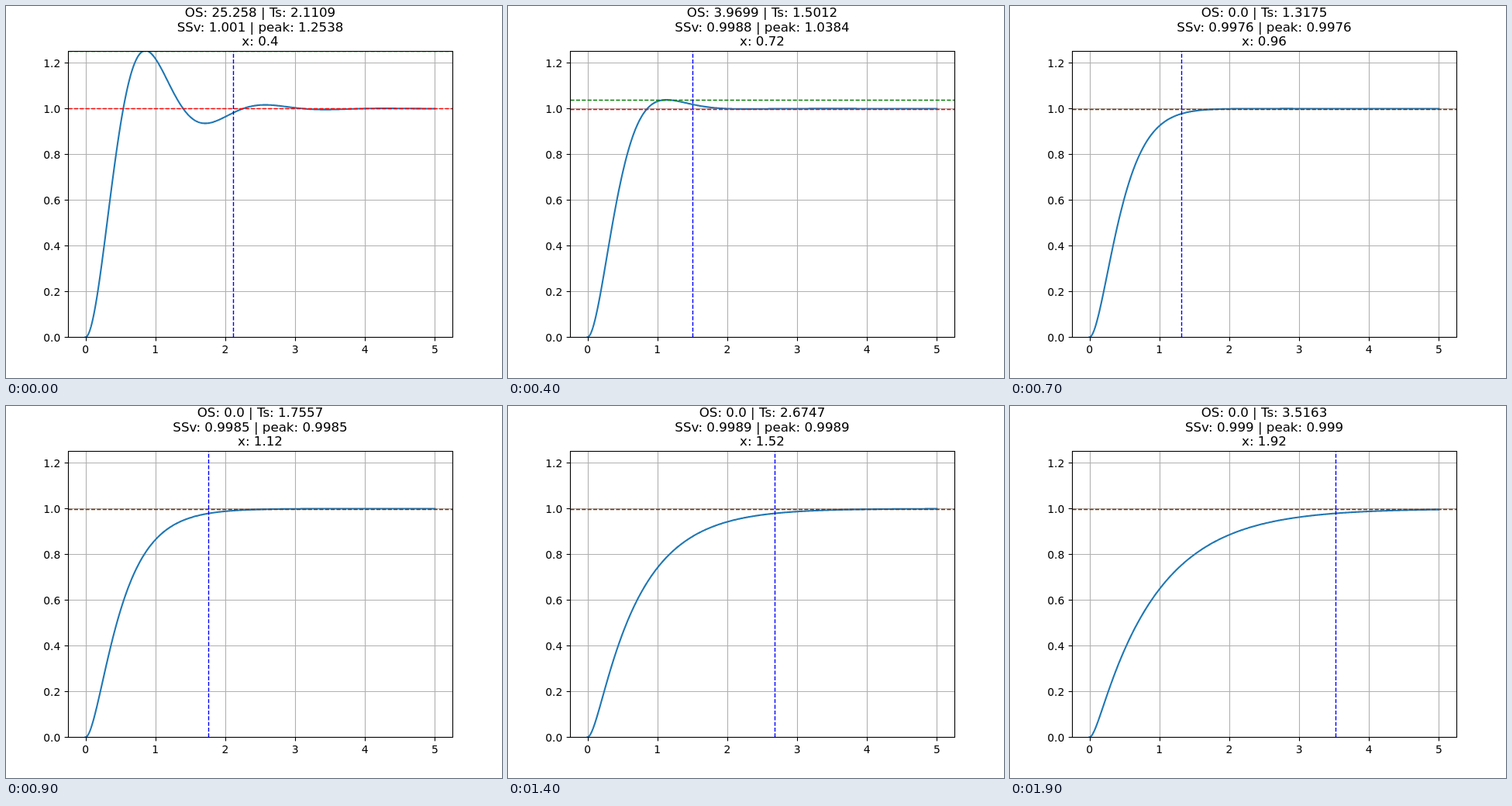
Animation of 640 by 480 pixels, one loop 2000 ms. Source, as an HTML page with a canvas:

```html
<!DOCTYPE html>
<html lang="en">
<head>
<meta charset="utf-8">
<title>Second-order step response</title>
<style>
  html, body { margin: 0; width: 100%; height: 100%; overflow: hidden; background: #fff; }
  canvas { display: block; }
</style>
</head>
<body>
<canvas id="stage" width="640" height="480"></canvas>
<script>
const ctx = document.getElementById("stage").getContext("2d");
const POINT = 100 / 72;               // pixels per typographic point
const BOX = { left: 80, right: 576, top: 57.6, bottom: 427.2 };
const NATURAL_FREQ = 4;
const STEPS = 20, STEP_MS = 100;
const Y_MAX = 1 + Math.exp(-Math.PI * 0.4 / Math.sqrt(1 - 0.4 ** 2));

const toX = t => BOX.left + (t + 0.25) * (BOX.right - BOX.left) / 5.5;
const toY = v => BOX.bottom - v * (BOX.bottom - BOX.top) / Y_MAX;
const snap = p => Math.round(p) + 0.5;

// Unit step response for damping ratio z.
function response(z, t) {
  const decay = z * NATURAL_FREQ;
  const root = NATURAL_FREQ * Math.sqrt(Math.abs(1 - z * z));
  if (z < 1) {
    return 1 - Math.exp(-decay * t) * (Math.cos(root * t) + decay / root * Math.sin(root * t));
  }
  const slow = decay - root, fast = decay + root;
  return 1 - (fast * Math.exp(-slow * t) - slow * Math.exp(-fast * t)) / (fast - slow);
}

// Measured over seven time constants, sampled at 1000 points.
function stepInfo(z) {
  const rate = NATURAL_FREQ * (z < 1 ? z : z - Math.sqrt(z * z - 1));
  const dt = 7 / rate / 999;
  const samples = Array.from({ length: 1000 }, (_, i) => response(z, i * dt));
  const final = samples[999];
  const peak = Math.max(...samples);
  let i = 999;
  while (i > 0 && Math.abs(samples[i] - final) < 0.02 * final) i--;
  return { final, peak, overshoot: 100 * (peak - final) / final, settling: (i + 1) * dt };
}

function format(value) {
  const rounded = +value.toFixed(4);
  return Number.isInteger(rounded) ? rounded.toFixed(1) : String(rounded);
}

function line(x1, y1, x2, y2, color, points, dash = []) {
  ctx.strokeStyle = color;
  ctx.lineWidth = points * POINT;
  ctx.setLineDash(dash.map(d => d * points * POINT));
  ctx.beginPath();
  ctx.moveTo(x1, y1);
  ctx.lineTo(x2, y2);
  ctx.stroke();
  ctx.setLineDash([]);
}

function text(str, x, y, points, align) {
  ctx.font = `${points * POINT}px "DejaVu Sans", sans-serif`;
  ctx.textAlign = align;
  ctx.fillStyle = "#000";
  ctx.fillText(str, x, y);
}

const left = snap(BOX.left), right = snap(BOX.right);
const top_ = snap(BOX.top), bottom = snap(BOX.bottom);
const DASH = [3.7, 1.6];
const horizontal = (v, color, width, dash) => line(left, snap(toY(v)), right, snap(toY(v)), color, width, dash);
const vertical = (t, color, width, dash) => line(snap(toX(t)), bottom, snap(toX(t)), top_, color, width, dash);

function drawAxes() {
  const tick = 3.5 * POINT;
  for (let t = 0; t <= 5; t++) {
    const x = snap(toX(t));
    vertical(t, "#b0b0b0", 0.8);
    line(x, bottom, x, bottom + tick, "#000", 0.8);
    text(String(t), toX(t), 448, 10, "center");
  }
  for (let i = 0; i <= 6; i++) {
    const v = i / 5, y = snap(toY(v));
    horizontal(v, "#b0b0b0", 0.8);
    line(left - tick, y, left, y, "#000", 0.8);
    text(v.toFixed(1), BOX.left - 2 * tick, Math.round(toY(v) + 5.3), 10, "right");
  }
}

function drawCurve(z) {
  ctx.strokeStyle = "#1f77b4";
  ctx.lineWidth = 1.5 * POINT;
  ctx.lineJoin = "round";
  ctx.lineCap = "square";
  ctx.beginPath();
  for (let i = 0; i <= 500; i++) ctx.lineTo(toX(i / 100), toY(response(z, i / 100)));
  ctx.stroke();
  ctx.lineCap = "butt";
}

function draw(step) {
  const z = +(0.4 + 0.08 * step).toFixed(2);
  const info = stepInfo(z);
  const overlapping = info.peak - info.final < 1e-4;

  ctx.fillStyle = "#fff";
  ctx.fillRect(0, 0, 640, 480);
  drawAxes();

  ctx.save();
  ctx.beginPath();
  ctx.rect(80, 58, 496, 369);
  ctx.clip();
  drawCurve(z);
  if (!overlapping) horizontal(info.peak, "#008000", 1, DASH);
  horizontal(info.final, overlapping ? "#803000" : "#f00", 1, DASH);
  vertical(info.settling, "#00f", 1, DASH);
  ctx.restore();

  ctx.strokeStyle = "#000";
  ctx.lineWidth = 0.8 * POINT;
  ctx.strokeRect(left, top_, right - left, bottom - top_);

  text(`OS: ${format(info.overshoot)} | Ts: ${format(info.settling)}`, 328, 14, 12, "center");
  text(`SSv: ${format(info.final)} | peak: ${format(info.peak)}`, 328, 33, 12, "center");
  text(`x: ${format(z)}`, 328, 51, 12, "center");
}

const start = performance.now();
let shown = -1;
function tick() {
  const step = Math.floor((performance.now() - start) / STEP_MS) % STEPS;
  if (step !== shown) draw(shown = step);
  requestAnimationFrame(tick);
}
tick();
</script>
</body>
</html>
```
